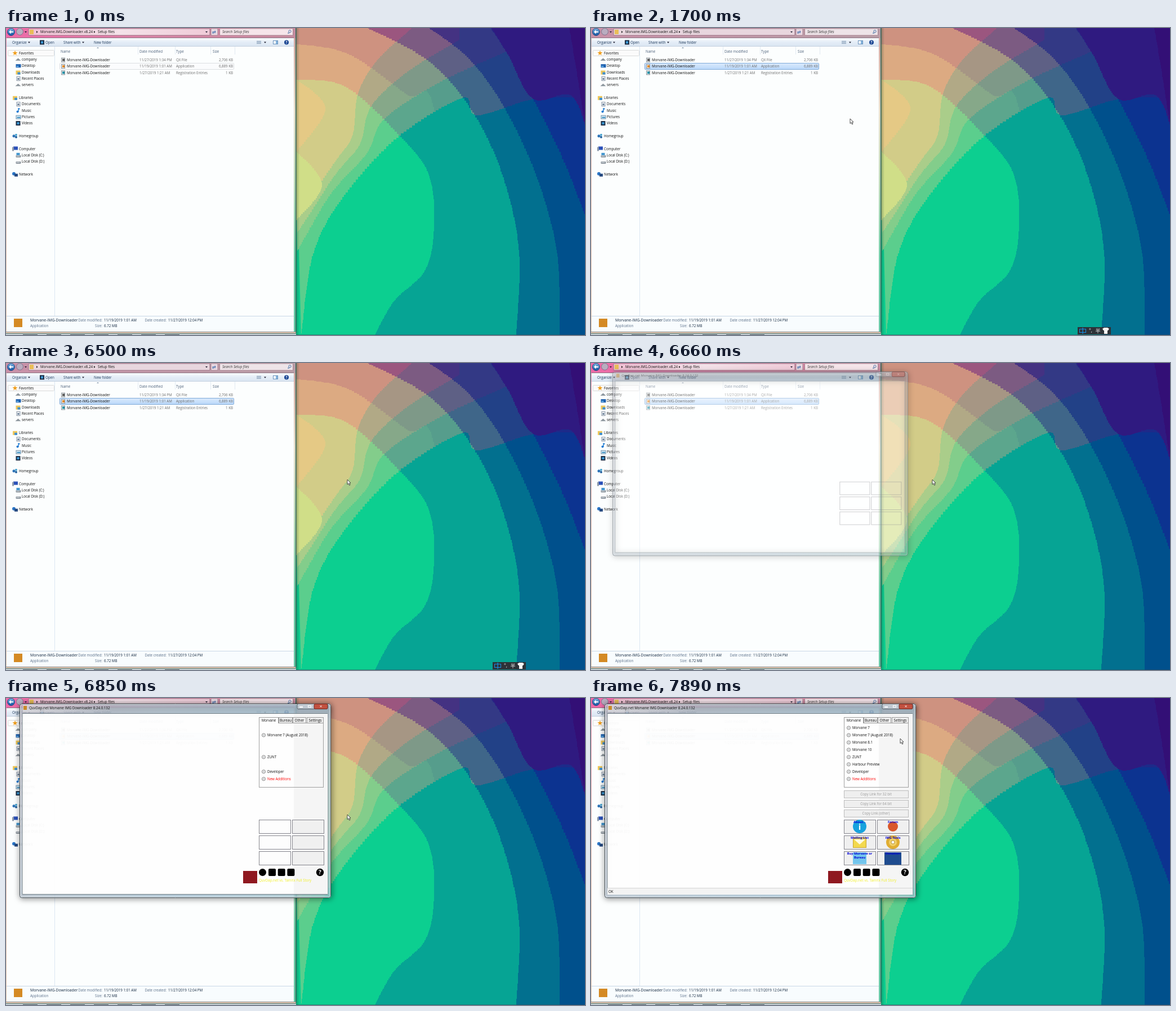
These frames come from a looping animation (1028 px wide and 545 px high, 7.99 s). An HTML page with a canvas:

```html
<!DOCTYPE html>
<html lang="en">
<head>
<meta charset="utf-8">
<title>Downloader launch</title>
<style>
html, body { margin: 0; width: 100%; height: 100%; overflow: hidden; }
canvas { display: block; }
</style>
</head>
<body>
<canvas id="stage" width="1028" height="545"></canvas>
<script>
const W = 1028, H = 545, LOOP = 7990;
const FONT = '"Open Sans", "Noto Sans", sans-serif';
const APP = 'Morvane-IMG-Downloader';
const screen = document.getElementById('stage').getContext('2d');
let g = screen;

// ---------- helpers ----------
function box(x, y, w, h, fill, line) {
  if (fill) { g.fillStyle = fill; g.fillRect(x, y, w, h); }
  if (line) { g.strokeStyle = line; g.lineWidth = 1; g.strokeRect(x + .5, y + .5, w - 1, h - 1); }
}
function round(x, y, w, h, r, fill, line) {
  g.beginPath(); g.roundRect(x, y, w, h, r);
  if (fill) { g.fillStyle = fill; g.fill(); }
  if (line) { g.strokeStyle = line; g.lineWidth = 1; g.stroke(); }
}
function disc(x, y, r, fill, line) {
  g.beginPath(); g.arc(x, y, r, 0, 7);
  if (fill) { g.fillStyle = fill; g.fill(); }
  if (line) { g.strokeStyle = line; g.lineWidth = .8; g.stroke(); }
}
function poly(fill, ...p) {
  g.beginPath();
  for (let i = 0; i < p.length; i += 2) g.lineTo(p[i], p[i + 1]);
  g.closePath(); g.fillStyle = fill; g.fill();
}
function text(s, x, y, color = '#111', { size = 6.2, align = 'left', style = '' } = {}) {
  g.font = `${style} ${size}px ${FONT}`;
  g.textAlign = align;
  g.fillStyle = color;
  g.fillText(s, x, y + size * .36);
}
function fade(x0, y0, x1, y1, ...colors) {
  const f = g.createLinearGradient(x0, y0, x1, y1);
  colors.forEach((c, i) => f.addColorStop(i / (colors.length - 1), c));
  return f;
}
const mix = (a, b, k) => a.map((v, i) => v + (b[i] - v) * k);
const rgb = c => `rgb(${c.map(Math.round)})`;
const clamp = v => Math.max(0, Math.min(1, v));
const arrowDown = (x, y) => poly('#223', x - 2, y - 1, x + 2, y - 1, x, y + 1.5);
const arrowRight = (x, y) => poly('#222', x - 1, y - 2, x + 1.5, y, x - 1, y + 2);

// ---------- wallpaper ----------
// Catmull-Rom curve through the points, drawn as small steps, closed over the corners.
function region(p, ...corners) {
  const n = p.length / 2;
  const at = (i, k) => p[2 * Math.max(0, Math.min(n - 1, i)) + k];
  const path = new Path2D();
  let lastY = p[1];
  path.moveTo(p[0], p[1]);
  for (let i = 0; i < n - 1; i++) for (let s = 1; s <= 24; s++) {
    const u = s / 24;
    const [x, y] = [0, 1].map(k => {
      const a = at(i - 1, k), b = at(i, k), c = at(i + 1, k), d = at(i + 2, k);
      return Math.round(b + .5 * u * (c - a + u * (2 * a - 5 * b + 4 * c - d + u * (3 * b - a - 3 * c + d))));
    });
    path.lineTo(x, lastY); path.lineTo(x, y);
    lastY = y;
  }
  for (let i = 0; i < corners.length; i += 2) path.lineTo(corners[i], corners[i + 1]);
  path.closePath();
  return path;
}
const arc = p => region(p, 510, H, 510, p[1]);
const diagonal = p => region(p, p[p.length - 2], 0, 510, 0);

// Nested arcs, each shaded from its low to its high colour across the diagonals.
function paintWallpaper() {
  const steep = [517,330, 585,235, 615,190, 625,115, 660,55, 720,0];
  const flat = [517,395, 575,295, 640,222, 672,160, 770,95, 890,40];
  const diagonals = [
    [524,545, 545,400, 600,296, 697,191, 810,124, 835,155, 935,126, 1028,124],
    flat, mix(flat, steep, .5), steep
  ].map(diagonal);
  const inner = [640,0, 750,60, 828,150, 882,265, 911,400, 906,545];
  const outer = [860,0, 892,50, 935,126, 1000,262, 1045,400, 1060,545];
  const teal = [6, 164, 148];
  const bands = [
    [[1100,0, 1100,545], [12, 51, 144], [55, 28, 128]],
    [outer, [0, 80, 140], [85, 42, 128]],
    [mix(inner, outer, .5), [2, 112, 143], [155, 86, 127]],
    [inner, teal, [206, 146, 128]],
    [[510,28, 605,46, 710,118, 760,148, 800,545], teal, [220, 170, 130]],
    [[510,92, 600,104, 697,191, 750,260, 760,350, 745,430, 690,485, 655,545], [12, 207, 144], [210, 204, 136]]
  ];
  for (const [curve, low, high] of bands) {
    g.save();
    g.clip(arc(curve));
    box(510, 0, W, H, rgb(low));
    diagonals.forEach((d, i) => { g.fillStyle = rgb(mix(low, high, .4 + i * .2)); g.fill(d); });
    g.restore();
  }
  const spot = (color, path) => { g.fillStyle = color; g.fill(path); };
  spot('#2f1a80', region([862,0, 892,50, 935,126, 1005,122, 1040,220], 1040, 0));
  spot('#330f76', region([1000,0, 1018,110, 1030,185], 1040, 0));
  spot('#e5c985', region([510,88, 567,145, 510,228]));
  spot('#d0de88', region([510,215, 561,280, 510,348]));
  box(514, 0, 7, H, fade(514, 0, 521, 0, 'rgba(20,60,50,.4)', 'rgba(20,60,50,0)'));
  box(0, 544, W, 1, 'rgba(40,70,90,.45)');
}
const wallpaper = document.createElement('canvas');
wallpaper.width = W; wallpaper.height = H;
g = wallpaper.getContext('2d');
paintWallpaper();
g = screen;

// ---------- file window ----------
const icons = {
  star(x, y) {
    g.beginPath();
    for (let i = 0; i < 10; i++) {
      const a = i * Math.PI / 5 - Math.PI / 2, r = i % 2 ? 2 : 4.8;
      g.lineTo(x + r * Math.cos(a), y + r * Math.sin(a));
    }
    g.fillStyle = '#f0a020'; g.fill();
  },
  cloud(x, y) { poly('#8d979e', x - 5, y + 2, x, y - 2.5, x + 5, y + 2); },
  screen(x, y) { box(x - 4, y - 3, 9, 6, '#1c5fae'); box(x - 3, y, 4, 2, '#69b5ea'); },
  folder(x, y) { box(x - 4, y - 3, 8, 7, '#edc75c'); box(x - 1, y, 5, 4, '#3f8fd0'); },
  page(x, y) { box(x - 3, y - 4, 7, 8, '#f5f7f9', '#8895a5'); box(x - 1, y - 1, 3, 3, '#607891'); },
  note(x, y) { disc(x - 1, y + 2, 2, '#1979d2'); box(x, y - 4, 1.3, 6, '#1979d2'); box(x, y - 4, 3, 2, '#1979d2'); },
  picture(x, y) { box(x - 4, y - 3, 9, 7, '#d5e8f5', '#7b98ad'); box(x - 2, y, 6, 2, '#3a90c0'); },
  film(x, y) { box(x - 4, y - 4, 8, 8, '#1d2e45'); box(x - 2, y - 2, 4, 4, '#3c9bd8'); },
  group(x, y) { disc(x - 2, y, 2.5, '#2e75b8'); disc(x + 2, y - 2, 2, '#48a4cf'); disc(x + 2, y + 2, 2, '#225f9c'); },
  computer(x, y) { box(x - 3, y - 4, 8, 6, '#2a50b8'); box(x - 5, y - 3, 3, 7, '#8e9bab'); },
  disk(x, y) { round(x - 4, y, 9, 4, 1, '#8d969e'); box(x - 3, y + 1, 6, 1, '#e0e6ea'); },
  system(x, y) { icons.disk(x, y); box(x - 3, y - 4, 6, 4, '#3f94ce'); },
  net(x, y) { disc(x - 2, y - 1, 3, '#2b75c5'); box(x - 1, y - 1, 6, 5, '#24487f'); }
};
// The first entry of each group is its heading.
const places = [
  'star Favorites|cloud company|screen Desktop|folder Downloads|page Recent Places|cloud servers',
  'folder Libraries|page Documents|note Music|picture Pictures|film Videos',
  'group Homegroup',
  'computer Computer|system Local Disk (C:)|disk Local Disk (D:)',
  'net Network'
].map(s => s.split('|'));
const files = [
  ['11/27/2019 1:34 PM', 'QX File', '2,706 KB', '#555'],
  ['11/19/2019 1:01 AM', 'Application', '6,889 KB', '#e08a28'],
  ['1/27/2019 1:21 AM', 'Registration Entries', '1 KB', '#1a8fa5']
];
const ROW = 11.32;

function drawFrame(active) {
  box(0, 0, 515, H, fade(0, 0, 0, H, active ? '#df86a4' : '#b9a4aa', '#dfb9ae', '#dfc4ae'));
  box(0, 0, 515, 18, active ? fade(0, 0, 515, 0, '#ee6aa8', '#d984a6', '#c68c9f') : fade(0, 0, 515, 0, '#c991a8', '#b99ea7'));
  box(511, 18, 4, 522, fade(0, 18, 0, 540, '#cfa69f', '#e3dcc9', '#b8d6b6', '#72cba8', '#66c6a5'));
  box(514, 0, 1.5, 541, '#35685c');
}
function drawNavigation(active) {
  round(40, 1, 322, 12, 1, active ? fade(40, 0, 362, 0, '#f2bfd4', '#f4e2e9', '#f0cbd8') : '#e8d6de', '#9c7183');
  round(379.5, 1, 130, 12, 1, active ? '#f6e5ea' : '#eee4e8', '#a98592');
  disc(24.5, 6.5, 6, '#b9adc0', '#716a85');
  disc(9, 7, 6.5, fade(0, 0, 0, 14, '#7fb7e5', '#0f4f9e'), '#183e70');
  poly('#fff', 5, 7, 9, 3.5, 9, 6, 13, 6, 13, 8, 9, 8, 9, 10.5);
  arrowDown(35, 7);
  box(42, 3, 7, 8, '#e8bd58');
  arrowRight(55, 7);
  text('Morvane.IMG.Downloader.v8.24', 61, 7);
  arrowRight(157, 7);
  text('Setup files', 163, 7);
  arrowDown(356, 7);
  round(364, 1, 12, 12, 1, '#ead9e2', '#a98592');
  text('\u21c4', 366, 7, '#17549e', { size: 8 });
  text('Search Setup files', 384, 7, '#333', { style: 'italic' });
  disc(504, 6, 2.2, null, '#225a98');
  box(500, 8.5, 3, 1, '#225a98');
}
function drawCommands() {
  const ink = '#1e395b';
  box(1, 18, 510, 14, fade(0, 18, 0, 32, '#fafcfe', '#e4edf7', '#dbe6f2'));
  box(1, 17, 510, 1, '#8d7583');
  text('Organize', 11, 25.5, ink); arrowDown(41, 25.5);
  icons.film(64, 25.5);
  text('Open', 70, 25.5, ink);
  text('Share with', 102, 25.5, ink); arrowDown(137, 25.5);
  text('New folder', 156, 25.5, ink);
  for (let y = 23; y < 29; y += 2) box(445, y, 8, 1, '#8098b3');
  arrowDown(460, 25.5);
  box(474, 22, 9, 7, '#fff', '#6a93bd'); box(479, 23, 3, 5, '#84b4dd');
  disc(498, 25.5, 4, '#1c4794');
  text('?', 498, 25.5, '#fff', { align: 'center', style: 'bold' });
}
function drawPlaces() {
  let y = 44.6;
  round(3.5, 39.5, 82, 10, 1, '#fbfbfb', '#dadada');
  for (const group of places) {
    group.forEach((entry, i) => {
      const [icon, ...name] = entry.split(' ');
      icons[icon](i ? 21.5 : 16, y);
      text(name.join(' '), i ? 28 : 23, y);
      y += ROW;
    });
    y += ROW;
  }
}
function drawFiles(selected) {
  for (const x of [234, 300, 363, 406]) box(x, 33, 1, 14, '#e2eaf2');
  poly('#8497ac', 161, 36, 165, 36, 163, 34);
  const head = '#4c607a', grey = '#6d6d6d';
  text('Name', 97, 41.5, head);
  text('Date modified', 237, 41.5, head);
  text('Type', 302, 41.5, head);
  text('Size', 367, 41.5, head);
  if (selected) round(95.5, 62.5, 309, 11, 1, fade(0, 62, 0, 74, '#dcebfc', '#b8d7fa'), '#7da9d8');
  else round(95.5, 62.5, 309, 11, 1, '#fbfcfd', '#dcdfe2');
  files.forEach(([date, type, size, tint], i) => {
    const y = 56.7 + i * ROW;
    box(98, y - 4, 7, 8, '#f2f4f5', '#8b9399');
    box(100, y - 2, 4, 4, tint);
    text(APP, 108, y);
    text(date, 237, y, grey);
    text(type, 302, y, grey);
    text(size, 403, y, grey, { align: 'right' });
  });
}
function drawDetails() {
  const pair = (label, value, x, y) => {
    text(label, x, y, '#5a6f88', { align: 'right' });
    text(value, x + 3, y, '#14283f');
  };
  box(1, 511, 510, 28, '#f8fcfe');
  box(1, 511, 510, 1, '#cbd8e6');
  box(14, 516, 15, 15, '#d48a24');
  text(APP, 43, 519, '#14283f', { size: 6.8 });
  text('Application', 43, 529, '#5a6f88');
  pair('Date modified:', '11/19/2019 1:01 AM', 171, 519);
  pair('Size:', '6.72 MB', 171, 529);
  pair('Date created:', '11/27/2019 12:04 PM', 285, 519);
  box(0, 539, 515, 1, '#8f8e8c');
  box(0, 542, 515, 1, '#4f7b78');
  box(0, 543, 515, 2, '#c9cfd4');
  for (let x = 30; x < 290; x += 42) box(x, 544, 26, 1, '#4a565c');
}
function drawFileWindow(active, selected) {
  drawFrame(active);
  drawNavigation(active);
  drawCommands();
  box(1, 32, 510, 479, '#fcfefe');
  box(1, 32, 510, 1, '#c3d0df');
  box(86, 33, 1, 478, '#dce7f2');
  drawPlaces();
  drawFiles(selected);
  drawDetails();
}

function drawInputBar() {
  box(864, 531, 59, 13, '#2d3238');
  box(867, 534, 12, 7, null, '#168fe6');
  box(872.5, 532, 1.2, 11, '#168fe6');
  text('\u00b0,', 884, 537, '#eee', { size: 9 });
  g.font = '9px "Noto Sans CJK SC", "Noto Sans CJK", sans-serif';
  g.textAlign = 'center'; g.fillText('\u534a', 900, 541);
  box(911, 533, 6, 10, '#f4f4f4');
  poly('#f4f4f4', 908, 534, 911, 532, 917, 532, 920, 534, 918, 537, 910, 537);
}

// ---------- downloader window ----------
const versions = ['Morvane 7', 'Morvane 7 (August 2018)', 'Morvane 8.1', 'Morvane 10', 'ZUNT', 'Harbour Preview', 'Developer', 'New Additions'];
const early = ['Morvane 7 (August 2018)', 'ZUNT', 'Developer', 'New Additions'];
const links = ['Copy Link for 32 bit', 'Copy Link for 64 bit', 'Copy Link (other)'];
// Each tile icon is drawn around the middle of its button.
const tiles = [
  ['About...', (x, y) => { disc(x, y, 12, '#17a2dd'); text('i', x, y + 1, '#fff', { size: 15, align: 'center', style: 'bold' }); }],
  ['Forum', (x, y) => disc(x, y, 9, '#d9572b')],
  ['Mailing List', (x, y) => { box(x - 12, y - 9, 24, 19, '#f3d94e', '#c9a52c'); poly('#fffbe0', x - 10, y - 5, x + 10, y - 5, x, y + 4); }],
  ['IMG Tools', (x, y) => { disc(x, y, 12, '#e0ad32'); disc(x, y, 7, '#f0cf68'); disc(x, y, 3, '#fff', '#a77d1c'); }],
  ['Buy Morvane or|Bureau', (x, y) => box(x - 12, y - 10, 24, 21, '#73c5ec')],
  ['Donation', (x, y) => box(x - 15, y - 10, 30, 22, '#1f4c8f')]
];

function drawGlass() {
  g.save();
  g.shadowColor = 'rgba(0,0,0,.85)'; g.shadowBlur = 11; g.shadowOffsetX = g.shadowOffsetY = 1;
  g.globalAlpha *= .75;
  g.beginPath();
  g.roundRect(24, 10, 553, 345, 4);
  g.rect(29, 27, 542, 322);
  g.fillStyle = fade(24, 10, 577, 355, '#c9c6d2', '#c0d0dd', '#b4d0e2', '#b0d4dc');
  g.fill('evenodd');
  g.restore();
  round(24.5, 10.5, 552, 344, 4, null, '#3c474e');
  round(25.5, 11.5, 550, 342, 3, null, 'rgba(255,255,255,.65)');
  box(30, 12, 160, 13, fade(30, 0, 190, 0, 'rgba(255,255,255,.45)', 'rgba(255,255,255,0)'));
  box(31, 14, 6, 7, '#c98a2a');
  text('QuvDap.net Morvane IMG Downloader 8.24.0.132', 41, 17.5);
  round(517, 10.5, 54, 9, 2, 'rgba(205,212,220,.7)', '#59636b');
  round(547, 10.5, 24, 9, 2, '#c2503f', '#6d2b25');
  box(521, 15, 6, 2, '#fff'); box(536, 13, 6, 4, null, '#fff');
  text('\u2715', 559, 15, '#fff', { align: 'center' });
}
function drawTiles(filled, loaded) {
  tiles.forEach(([name, icon], i) => {
    const x = 449 + i % 2 * 59, y = 216 + (i >> 1) * 28;
    box(x, y, 57, 25, !filled ? null : loaded || i % 2 ? '#f0f0f0' : '#fdfdfd', '#85858d');
    if (!loaded) return;
    icon(x + 28, y + 12);
    name.split('|').forEach((s, k) => text(s, x + 28, y + 4 + k * 6.5, '#0000d8', { size: 5.6, align: 'center', style: 'bold' }));
  });
}
function drawControls(loaded) {
  box(449, 44, 115, 115, null, '#a0a0a0');
  const tab = (s, x, w, fill) => {
    box(x, 34, w, 11, fill, '#9b9b9b');
    text(s, x + w / 2, 39.5, '#111', { align: 'center' });
  };
  tab('Bureau', 484, 25, '#eee');
  tab('Other', 509, 24, '#eee');
  tab('Settings', 534, 30, '#eee');
  tab('Morvane', 449, 35, '#fff');
  box(450, 44, 33, 1, '#fff');
  versions.forEach((s, i) => {
    if (!loaded && !early.includes(s)) return;
    const y = 53 + i * 12.95;
    disc(457.5, y, 3.1, '#ececec', '#777');
    disc(457.5, y, 1.6, '#d0d3d5');
    text(s, 464, y, s === 'New Additions' ? '#f00' : '#111');
  });
  box(421, 307, 25, 22, '#8f1820');
  disc(455.5, 309.5, 6.5, '#000');
  for (let i = 0; i < 3; i++) round(466 + i * 16.7, 303, 13, 13, 2, '#000');
  disc(557.5, 309.5, 6.7, '#000');
  text('?', 557.5, 309.5, '#fff', { size: 10, align: 'center', style: 'bold' });
  text('QuvDap.net vs. Tamrix Full Story', 449, 324, '#f1ef28');
  if (!loaded) return;
  links.forEach((s, i) => {
    box(449, 164 + i * 17, 115, 14, '#efefef', '#bcbcbc');
    text(s, 506, 171 + i * 17, '#9a9a9a', { align: 'center' });
  });
  box(29, 337, 542, 12, '#f3f3f3');
  box(29, 337, 542, 1, '#d5d5d5');
  text('OK', 31, 343.5);
}
function drawDialog(p, filled, loaded) {
  const scale = .932 + .068 * p;
  const opacity = 1 - (1 - p) ** 2;
  g.save();
  g.translate(300, 112);
  g.scale(scale, scale);
  g.translate(-300, -112);
  g.globalAlpha = opacity;
  drawGlass();
  g.globalAlpha = opacity * .96;
  box(28.5, 27, 543, 322, '#fefefe', '#69777f');
  g.globalAlpha = opacity;
  if (filled) box(511, 28, 60, 320, '#f5f5f5');
  drawTiles(filled, loaded);
  if (filled) drawControls(loaded);
  g.restore();
}

// ---------- pointer ----------
const home = [772, 463];
const moves = [
  { from: 70, to: 850, end: [163, 69] },
  { from: 1210, to: 1930, end: [611, 208] },
  { from: 2160, to: 2850, end: [606, 207] },
  { from: 7175, to: 7480, end: [550, 138] },
  { from: 7600, to: 7870, end: [549, 72] }
];
function pointerAt(t) {
  return moves.reduce((at, m) => {
    const u = clamp((t - m.from) / (m.to - m.from));
    return mix(at, m.end, u * u * (3 - 2 * u));
  }, home);
}
function drawPointer(t) {
  const [x, y] = pointerAt(Math.floor(t / 75) * 75).map(Math.round);
  if (t >= 1210 && t < 1310) disc(x + 1, y + 5, 5, 'rgba(250,235,60,.7)');
  g.save();
  g.translate(x, y);
  poly('#fff', 0, 0, 0, 8.5, 2, 6.8, 3.5, 10, 5, 9.3, 3.6, 6.2, 6, 6);
  g.strokeStyle = '#222'; g.lineWidth = .8; g.stroke();
  g.restore();
}

// ---------- timeline ----------
function draw(t) {
  const waiting = t >= 1400 && t < 6600;
  g.drawImage(wallpaper, 0, 0);
  drawFileWindow(!waiting, t >= 780);
  if (waiting) drawInputBar();
  if (t >= 6600) drawDialog(clamp((t - 6600) / 250), t >= 6850, t >= 7110);
  if (t >= 70) drawPointer(t);
}
const start = performance.now();
function tick() {
  draw((performance.now() - start) % LOOP);
  requestAnimationFrame(tick);
}
tick();
</script>
</body>
</html>
```
